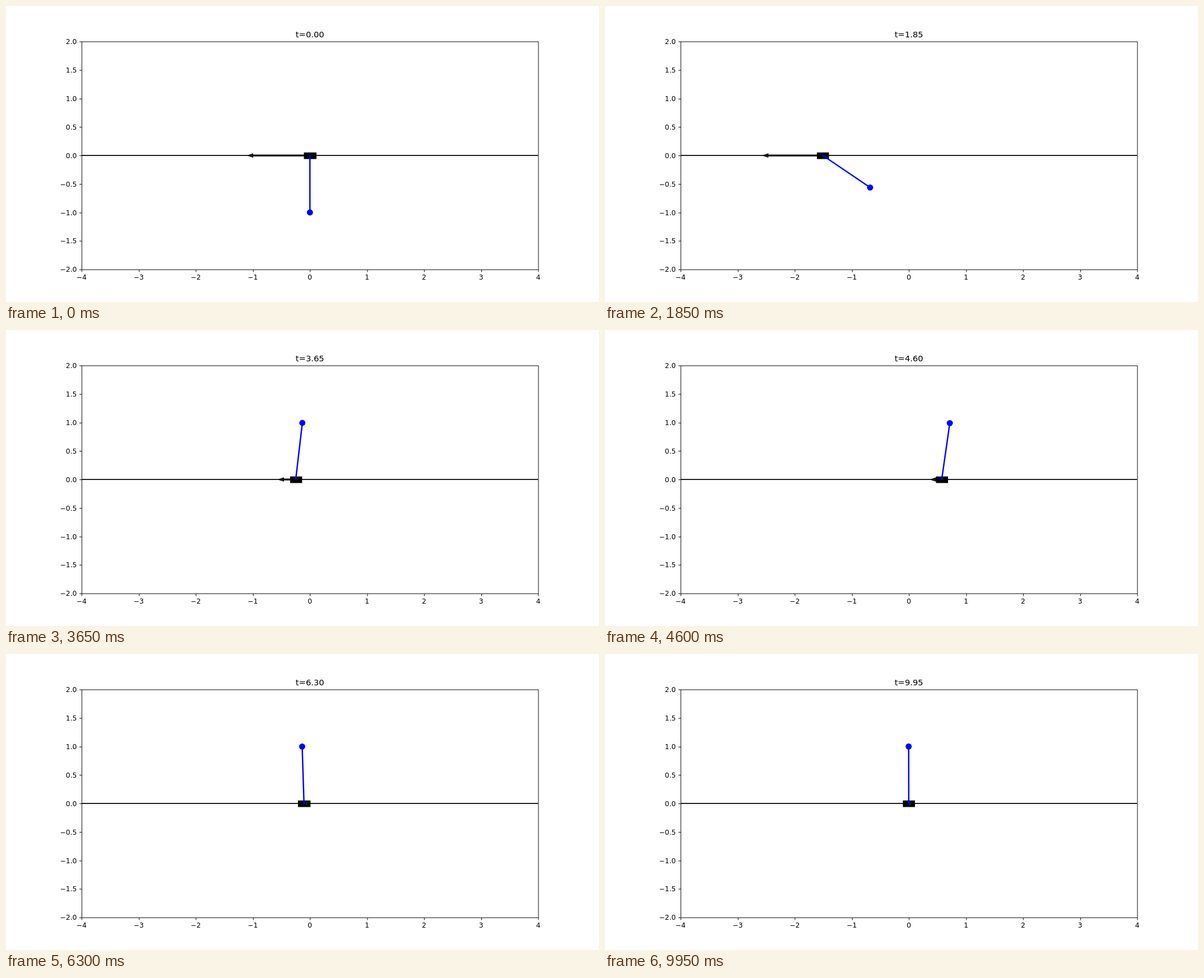
Recreate the animation shown at these times as an HTML page. Size 1058x529 px, loop 10000 ms.

```html
<!DOCTYPE html>
<html lang="en">
<head>
<meta charset="utf-8">
<title>Cart and pole</title>
<style>
  html, body { margin: 0; width: 100%; height: 100%; overflow: hidden; background: #fff; }
  svg { display: block; }
  text { font-family: "DejaVu Sans", sans-serif; font-size: 13.89px; fill: #000; }
  #title { font-size: 16.67px; text-anchor: middle; }
  .axis { fill: none; stroke: #000; stroke-width: 1.11; }
</style>
</head>
<body>
<svg width="1058" height="529" viewBox="0 0 1200 600">
  <clipPath id="box"><rect x="153" y="72" width="924" height="462"/></clipPath>
  <g clip-path="url(#box)">
    <path id="cart" stroke="#000" stroke-width="1.39"/>
    <path id="arrow" fill="#1f77b4" stroke="#000" stroke-width="1.39" stroke-miterlimit="10"/>
    <path d="M153 303H1077" stroke="#000" stroke-width="2.08"/>
    <path id="rod" stroke="#00f" stroke-width="2.78" stroke-linecap="square"/>
    <circle id="bob" r="6.2" fill="#00f"/>
  </g>
  <g id="axes"></g>
  <text id="title" x="615" y="63.7"></text>
</svg>
<script>
const $ = id => document.getElementById(id);
const UNIT = 115.5;
const px = x => 615 + UNIT * x;
const py = y => 303 - UNIT * y;
const snap = v => Math.floor(v + 0.5) + 0.5;
const clamp = v => Math.max(-1, Math.min(1, v));

// turning points: time, value, share of the way there spent speeding up
const CART = [[0, 0], [1.1, -3.94, .5], [2.03, -1.31, .5], [2.8, -2.3, .72], [4.446, .599, .2]];
const POLE = [[0, 0], [.88, 108, .5], [1.95, -60, .65], [2.85, 97, .46], [3.951, 195.9, .2]];

// constant push, then constant braking, between two turning points
function glide(points, t) {
  const i = points.findIndex(p => p[0] > t);
  const [t0, from] = points[i - 1], [t1, to, share] = points[i];
  const span = t1 - t0, p = (t - t0) / span, d = to - from;
  const speedUp = p < share;
  return {
    pos: from + d * (speedUp ? p * p / share : 1 - (1 - p) ** 2 / (1 - share)),
    acc: 2 * d / span ** 2 / (speedUp ? share : share - 1)
  };
}

// damped oscillation around the upright pose
function settle(t, size, phase) {
  const s = t - 5.67;
  return size * Math.exp(-0.95 * s) * Math.sin(1.7 * s - phase);
}

function state(t) {
  const swinging = t < CART.at(-1)[0];
  const cart = swinging && glide(CART, t);
  return {
    x: swinging ? cart.pos : settle(t, -0.2145, 0),
    force: swinging ? clamp(0.079 * cart.acc) : settle(t, -0.0472, 2.25),
    angle: t < POLE.at(-1)[0]
      ? glide(POLE, t).pos * Math.PI / 180
      : Math.PI + settle(t, 0.0622, 2.3)
  };
}

function arrowPath(x, force) {
  const a = px(x), b = px(x + force), tip = b + Math.sign(force) * 0.09 * UNIT;
  const y = py(0), w = 0.01 * UNIT, h = 0.03 * UNIT;
  return `M${a} ${y - w}H${b}V${y - h}L${tip} ${y}L${b} ${y + h}V${y + w}H${a}Z`;
}

function cartPath(x) {
  const left = snap(px(x - .1)), right = snap(px(x + .1));
  return `M${left} ${snap(py(.05))}H${right}V${snap(py(-.05))}H${left}Z`;
}

function draw(t) {
  const { x, angle, force } = state(t);
  const bx = px(x - Math.sin(angle)), by = py(-Math.cos(angle));
  $("title").textContent = "t=" + t.toFixed(2);
  $("cart").setAttribute("d", cartPath(x));
  $("arrow").setAttribute("d", arrowPath(x, force));
  $("rod").setAttribute("d", `M${px(x)} ${py(0)}L${bx} ${by}`);
  $("bob").setAttribute("cx", bx);
  $("bob").setAttribute("cy", by);
}

function buildAxes() {
  const label = (v, digits) => v.toFixed(digits).replace("-", "\u2212");
  const left = snap(px(-4)), right = snap(px(4)), top = snap(py(2)), bottom = snap(py(-2));
  let lines = `M${left} ${top}H${right}V${bottom}H${left}Z`, texts = "";
  for (let v = -4; v <= 4; v++) {
    lines += `M${snap(px(v))} ${bottom}v4.86`;
    texts += `<text x="${px(v)}" y="554.5" text-anchor="middle">${label(v, 0)}</text>`;
  }
  for (let v = -2; v <= 2; v += 0.5) {
    lines += `M${left} ${snap(py(v))}h-4.86`;
    texts += `<text x="143.3" y="${py(v) + 5.2}" text-anchor="end">${label(v, 1)}</text>`;
  }
  $("axes").innerHTML = `<path class="axis" d="${lines}"/>${texts}`;
}

const start = performance.now();
function tick() {
  const step = Math.floor((performance.now() - start) / 50) % 200;
  draw(step / 20);
  requestAnimationFrame(tick);
}
buildAxes();
tick();
</script>
</body>
</html>
```
